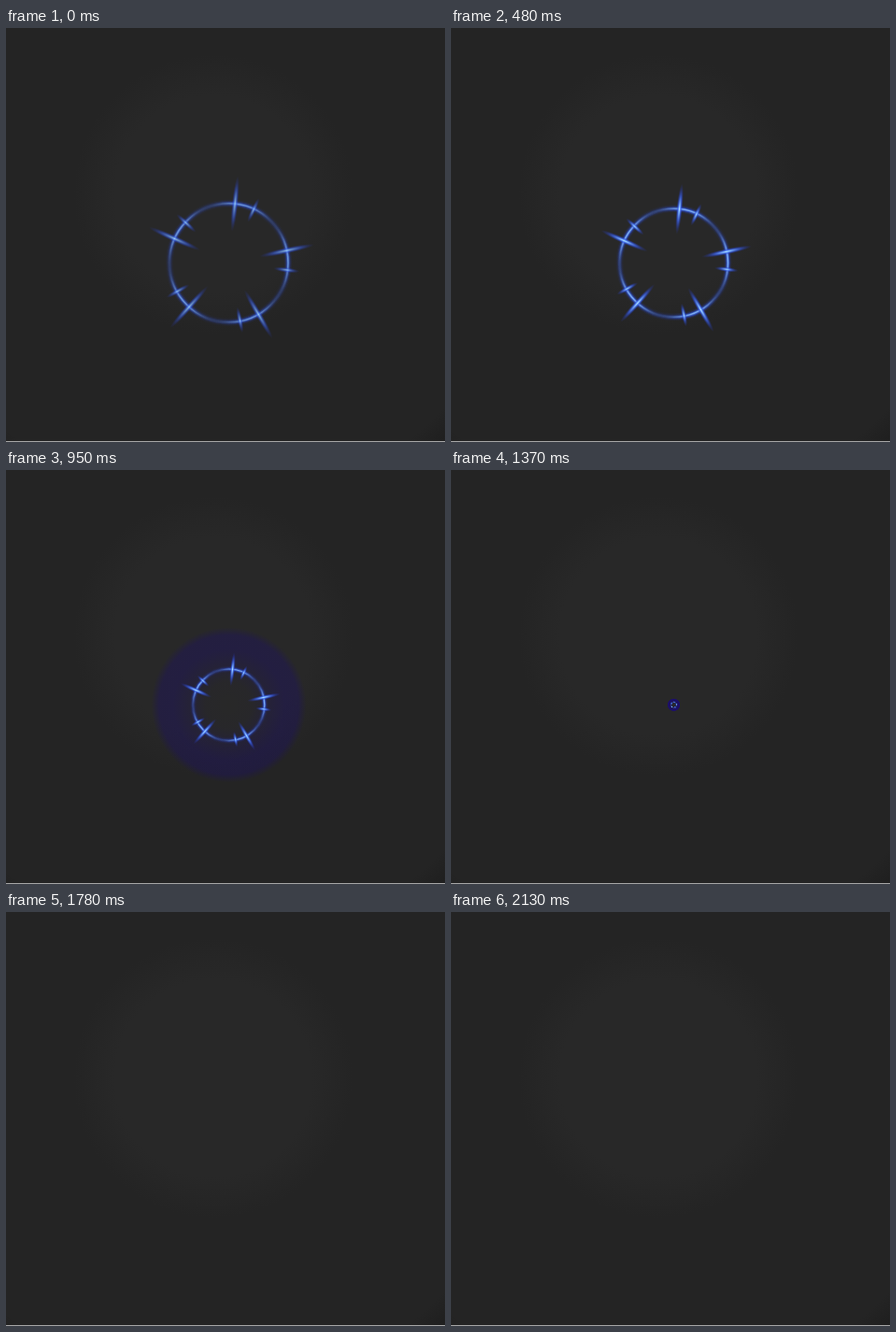
These frames come from a looping animation (470x443 px, 2210 ms). An HTML page with a canvas:

```html
<!DOCTYPE html>
<html lang="en">
<head>
<meta charset="utf-8">
<title>Pulse ring</title>
<style>
  html, body { margin: 0; width: 470px; height: 443px; overflow: hidden; background: #242424; }
  canvas { display: block; }
</style>
</head>
<body>
<canvas id="stage" width="470" height="443"></canvas>
<script>
const ctx = document.getElementById('stage').getContext('2d');
const LOOP = 2210, STEP = 60;
const CENTER = { x: 238.5, y: 251.3 };
const FULL = 63.5;
const rad = deg => deg * Math.PI / 180;

// Stages of a burst: ring radius, ring strength, halo radius, halo strength
const stages = [
  { ring: 1.2, glow: 0.5, halo: 2.5, haze: 0.8 },
  { ring: 3, glow: 0.85, halo: 7, haze: 1 },
  { ring: 17.5, glow: 1, halo: 45, haze: 0.95 },
  { ring: 38.3, glow: 1, halo: 83, haze: 0.38 },
  { ring: 58, glow: 1, halo: 0, haze: 0 },
  { ring: FULL, glow: 0.74, halo: 0, haze: 0 }
];

const pulses = [
  { start: 0, end: 60, first: 5 },
  { start: 240, end: 600, first: 0 },
  { start: 830, end: 1070, first: 1 },
  { start: 1370, end: 1610, first: 1 },
  { start: 1900, end: 2130, first: 1 }
];

function radial(x, y, r, stops) {
  const g = ctx.createRadialGradient(x, y, 0, x, y, r);
  for (const [at, color] of stops) g.addColorStop(at, color);
  return g;
}

function disc(r, fill) {
  ctx.fillStyle = fill;
  ctx.beginPath();
  ctx.arc(0, 0, r, 0, 2 * Math.PI);
  ctx.fill();
}

function drawBackground() {
  ctx.fillStyle = radial(222, 178, 365, [
    [0, '#282828'], [0.29, '#282828'], [0.41, '#242424'],
    [0.92, '#242424'], [1, '#1e1e1e']
  ]);
  ctx.fillRect(0, 0, 470, 443);
  ctx.fillStyle = '#a8a8a8';
  ctx.fillRect(0, 442, 470, 1);
}

function drawHalo({ halo, haze }) {
  if (!haze) return;
  const tint = a => `rgba(27,14,106,${a * haze})`;
  disc(halo, radial(0, 0, halo, [
    [0, tint(0)], [0.3, tint(0.08)], [0.48, tint(0.55)], [0.72, tint(1)],
    [0.9, tint(0.95)], [1, tint(0)]
  ]));
}

// Five bright arcs, each spanning one long and one short spark
function arcGradient(color, floor, power) {
  const g = ctx.createConicGradient(rad(-76), 0, 0);
  const count = 60;
  for (let i = 0; i <= count; i++) {
    const wave = (1 + Math.cos(10 * Math.PI * i / count)) / 2;
    g.addColorStop(i / count, `rgba(${color},${floor + (1 - floor) * wave ** power})`);
  }
  return g;
}

function drawRing(r, thickness, glow) {
  const layers = [
    [8, 0.14, '35,60,210', 0.45],
    [5.4, 0.3, '45,80,230', 0.4],
    [3.4, 0.6, '65,110,250', 0.32],
    [1.6, 0.75, '145,200,255', 0.08]
  ];
  for (const [width, alpha, color, floor] of layers) {
    ctx.globalAlpha = alpha * glow;
    ctx.strokeStyle = arcGradient(color, floor, 1.2);
    ctx.lineWidth = width * thickness;
    ctx.beginPath();
    ctx.arc(0, 0, r, 0, 2 * Math.PI);
    ctx.stroke();
  }
}

function drawSpark(deg, r, length, width, glow) {
  ctx.save();
  ctx.globalAlpha = glow;
  ctx.rotate(rad(deg));
  ctx.translate(r, 0);
  ctx.scale(length, width);
  disc(1, radial(0, 0, 1, [
    [0, 'rgba(175,225,255,1)'], [0.2, 'rgba(115,170,255,0.95)'],
    [0.5, 'rgba(58,98,240,0.7)'], [0.78, 'rgba(42,68,205,0.28)'],
    [1, 'rgba(35,50,180,0)']
  ]));
  ctx.restore();
}

function drawBurst(stage) {
  const scale = stage.ring / FULL;
  const thickness = Math.sqrt(scale);
  ctx.save();
  ctx.translate(CENTER.x, CENTER.y);
  drawHalo(stage);
  drawRing(stage.ring, thickness, stage.glow);
  for (let i = 0; i < 5; i++) {
    const deg = -84 + 72 * i;
    drawSpark(deg, stage.ring, 30 * scale, 3.5 * thickness, stage.glow);
    drawSpark(deg + 19, stage.ring * 0.98, 14 * scale, 2.9 * thickness, stage.glow * 0.9);
  }
  ctx.restore();
}

function frame() {
  const t = performance.now() % LOOP;
  drawBackground();
  const pulse = pulses.find(p => t >= p.start && t < p.end);
  if (pulse) drawBurst(stages[pulse.first + Math.floor((t - pulse.start) / STEP)]);
  requestAnimationFrame(frame);
}
frame();
</script>
</body>
</html>
```
